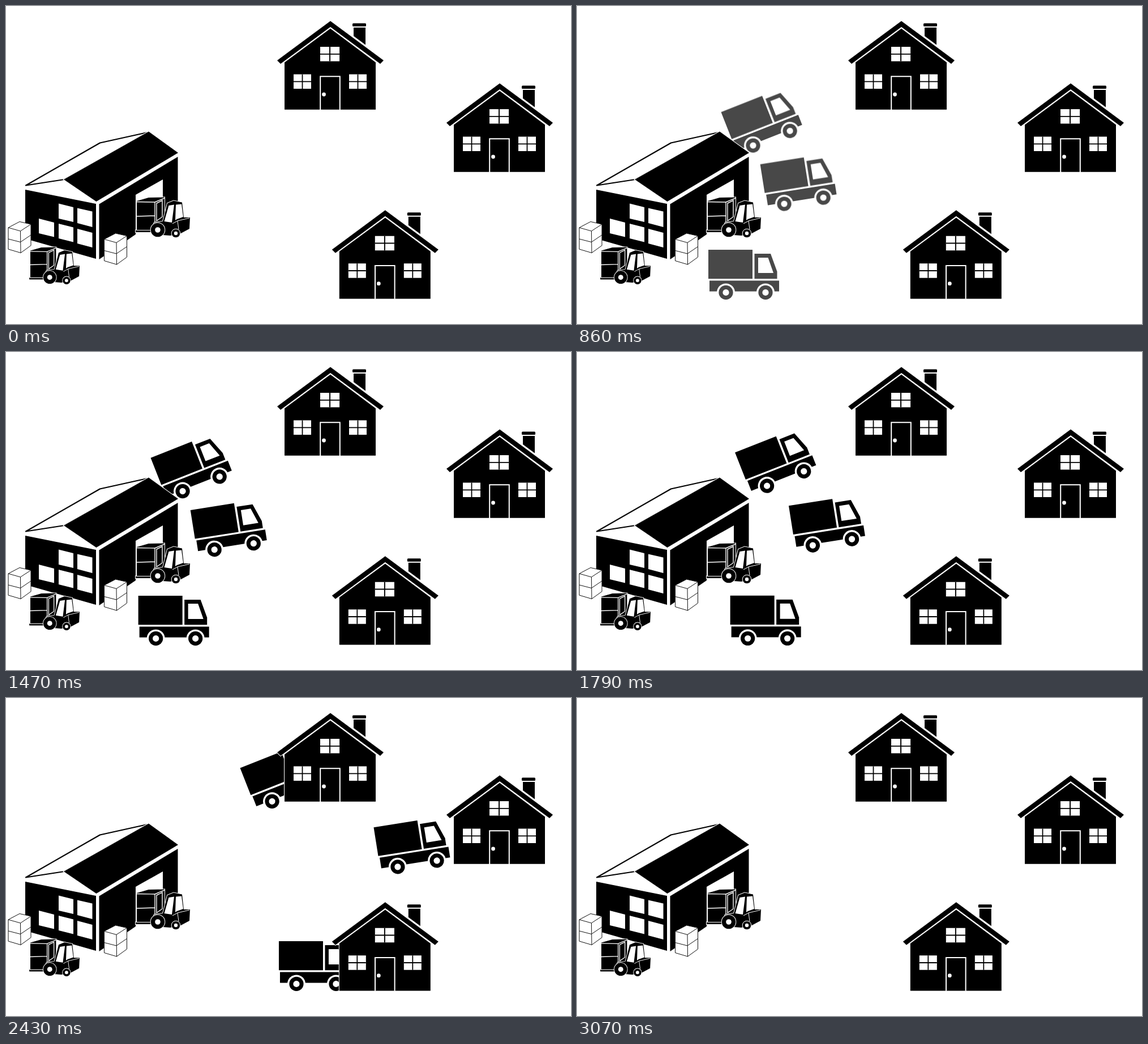
An HTML page for the animation above (3270 ms loop, 998 px wide and 561 px high).

```html
<!DOCTYPE html>
<html lang="en">
<head>
<meta charset="utf-8">
<title>Warehouse deliveries</title>
<style>
  html, body { margin: 0; height: 100%; overflow: hidden; background: #fff; }
  svg { display: block; width: 100vw; height: 100vh; }
  .w { fill: #fff; }
  .line { fill: none; stroke: #fff; }
  .halo { stroke: #fff; stroke-width: 2; paint-order: stroke; }
</style>
</head>
<body>
<svg viewBox="0 0 998 561">
  <defs>
    <g id="pane">
      <path class="w" d="M0 0h31v25.5h-31z"/>
      <path d="M15.5 0v25.5M0 12.8h31" stroke="#000" stroke-width="1.8"/>
    </g>

    <g id="house">
      <path class="halo" d="M492 182.7V99.4L573 39.8L653 99.4V182.7z"/>
      <path class="halo" d="M479 96L573 26.5L667 96L661 102L573 37L485 102z"/>
      <path d="M614 38h21v30.5L614 53z"/>
      <rect x="612" y="30.5" width="24" height="5.5" rx="1.5"/>
      <use href="#pane" transform="translate(555 72) scale(1.1 1)"/>
      <use href="#pane" x="508" y="120.5"/>
      <use href="#pane" x="606" y="120.5"/>
      <path class="line" d="M555.2 183V124.2H589.8V183" stroke-width="2"/>
      <circle class="w" cx="561.5" cy="156" r="3.4"/>
    </g>

    <g id="wheel">
      <circle class="w" r="16"/>
      <circle r="12.6"/>
      <circle class="w" r="5.6"/>
    </g>

    <!-- origin at the centre of the rear wheel -->
    <g id="truck">
      <path d="M-31 -75.5h78v51.3h-78z"/>
      <path d="M50.5 -68.5H79L90.5 -37V-24.2H50.5z"/>
      <path class="w" d="M57 -61.5H74.5L84 -34.5H57z"/>
      <path d="M-29 -20.9H94V-2H-29z"/>
      <use href="#wheel"/>
      <use href="#wheel" x="70"/>
    </g>

    <g id="forklift">
      <path class="halo" d="M229 395.5h30v3.5h-30z"/>
      <path class="halo" d="M231 344L252 338L280 337.5V385L258 395H231z"/>
      <g class="line" stroke-width="1.4">
        <path d="M231 345.5L263 346L280 339M263 346V386M231 371L263 370M266 348L276 343V372L266 379z"/>
      </g>
      <path class="halo" d="M256 395L262 382L277 380L285 348L296 343.5L311 346.5L314 373L325 373L324 393L309 401L290 405L262 403z"/>
      <path class="w" d="M287.5 352L297 350.5L293 382L279.5 380zM300 350.5L310 349.5L313 372L302 376L299 378z"/>
      <path class="line" d="M294 384L303 379L324 374M303 379L305 394"/>
      <circle class="halo" cx="268" cy="395" r="12.3"/>
      <circle class="w" cx="268" cy="395" r="4.8"/>
      <circle class="halo" cx="300" cy="401" r="7.3"/>
      <circle class="w" cx="300" cy="401" r="3.2"/>
    </g>

    <g id="boxes" fill="#fff" stroke="#111" stroke-linejoin="round">
      <path d="M4 391L24 380.5L44 385V422.5L26 435.5L4 429z"/>
      <path d="M4 391L25.5 397L44 385M25.5 397L26 435.5M4 411L25.5 416.5L44 404" fill="none"/>
    </g>
  </defs>

  <g id="trucks"></g>

  <use href="#house"/>
  <use href="#house" x="299" y="110"/>
  <use href="#house" x="96.8" y="333.7"/>

  <g id="warehouse">
    <path d="M35 316.5L166 241.5L252 222.5L103 306z" fill="#fff" stroke="#000" stroke-width="2.2" stroke-linejoin="round"/>
    <path class="halo" d="M252 221.5L304 259L159.5 345L102 306z"/>
    <path d="M34 324L159 349V446L34 410.5z"/>
    <path d="M164.5 349.5L303.5 266V352L164.5 447z"/>
    <path class="w" d="M229 333L277 306V371L229 404z"/>
    <path class="w" d="M93 348.5l26 6.5v26l-26 -6zM126 356.5l26.5 6v27.5l-26.5 -7zM58 375l27 7v25.5l-27 -6.5zM93 384l26 6.5v26l-26 -6.5zM126 393l26.5 7v26l-26.5 -7z"/>
  </g>
  <use href="#boxes"/>
  <use href="#boxes" x="169.5" y="20.5"/>
  <use href="#forklift"/>
  <use href="#forklift" transform="translate(43 425) scale(.926) translate(-231 -337)"/>
</svg>
<script>
  const LOOP = 3270, STEP = 40;
  const group = document.getElementById('trucks');

  // Start of the rear wheel, tilt in degrees, and total travel
  const trucks = [
    { x: 311, y: 246, tilt: -21.5, dx: 240.8, dy: -96.4 },
    { x: 366, y: 349, tilt: -9, dx: 493.5, dy: -77.4 },
    { x: 263, y: 505.4, tilt: 0, dx: 378.5, dy: -1.5 }
  ];
  for (const truck of trucks) {
    truck.el = document.createElementNS('http://www.w3.org/2000/svg', 'use');
    truck.el.setAttribute('href', '#truck');
    group.append(truck.el);
  }

  const clamp = v => Math.min(1, Math.max(0, v));
  const smooth = u => u * u * u * (10 - 15 * u + 6 * u * u);
  const snap = (t, offset) => Math.floor((t - offset) / STEP) * STEP + offset;

  function draw(now) {
    const t = now % LOOP;
    const gone = t >= 3070;
    group.style.opacity = gone ? 0 : clamp((snap(t, 20) - 500) / 500);
    const p = smooth(clamp((snap(t, 30) - 1320) / 1890));
    for (const { el, x, y, tilt, dx, dy } of trucks) {
      el.setAttribute('transform', `translate(${x + dx * p} ${y + dy * p}) rotate(${tilt})`);
    }
    requestAnimationFrame(draw);
  }
  draw(performance.now());
</script>
</body>
</html>
```
